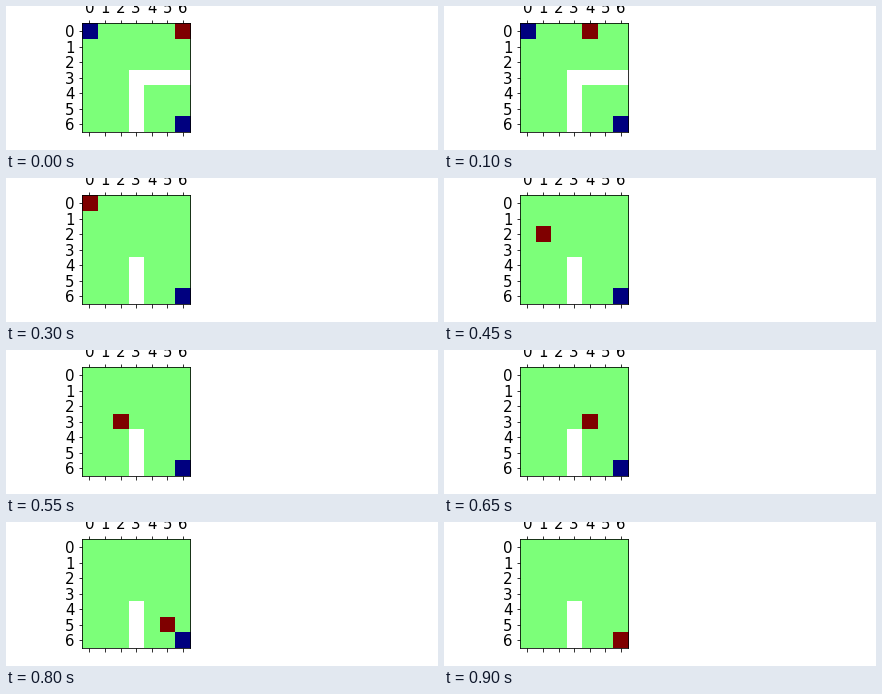
These frames come from a looping animation (432x144 px, 950 ms). A matplotlib script:

```python
import numpy as np
import matplotlib.pyplot as plt
from matplotlib.animation import FuncAnimation

N = 7
STEP_MS = 50
SWITCH, GOAL = (0, 0), (6, 6)

plt.rcParams.update({"font.family": "DejaVu Sans", "font.size": 15})


def is_wall(row, col, door_open):
    if row == 3 and col >= 3:
        return not door_open
    return col == 3 and row > 3


def make_path():
    """Walk left to the switch, then go down and right in turns to the goal."""
    path = [(0, col) for col in range(N - 1, -1, -1)]
    row, col = SWITCH
    go_down = True
    while (row, col) != GOAL:
        if go_down and not is_wall(row + 1, col, True):
            row += 1
            go_down = False
        else:
            col += 1
            go_down = True
        path.append((row, col))
    return path


path = make_path()
switch_step = path.index(SWITCH)


def grid(step):
    door_open = step >= switch_step
    cells = np.zeros((N, N))
    for row, col in np.ndindex(N, N):
        if is_wall(row, col, door_open):
            cells[row, col] = np.nan
    if not door_open:
        cells[SWITCH] = -1
    cells[GOAL] = -1
    cells[path[step]] = 1
    return np.ma.masked_invalid(cells)


fig, (ax, blank) = plt.subplots(1, 2, figsize=(6, 2), dpi=72, facecolor="white")
fig.subplots_adjust(left=0.125, right=0.9, bottom=0.125, top=0.88, wspace=0.2)
blank.axis("off")
image = ax.matshow(grid(0), cmap="jet", vmin=-1, vmax=1)
ax.set_xticks(range(N))
ax.set_yticks(range(N))


def update(step):
    image.set_data(grid(step))
    return [image]


anim = FuncAnimation(fig, update, frames=len(path), interval=STEP_MS,
                     repeat=True, repeat_delay=0, blit=False)
plt.show()
```
